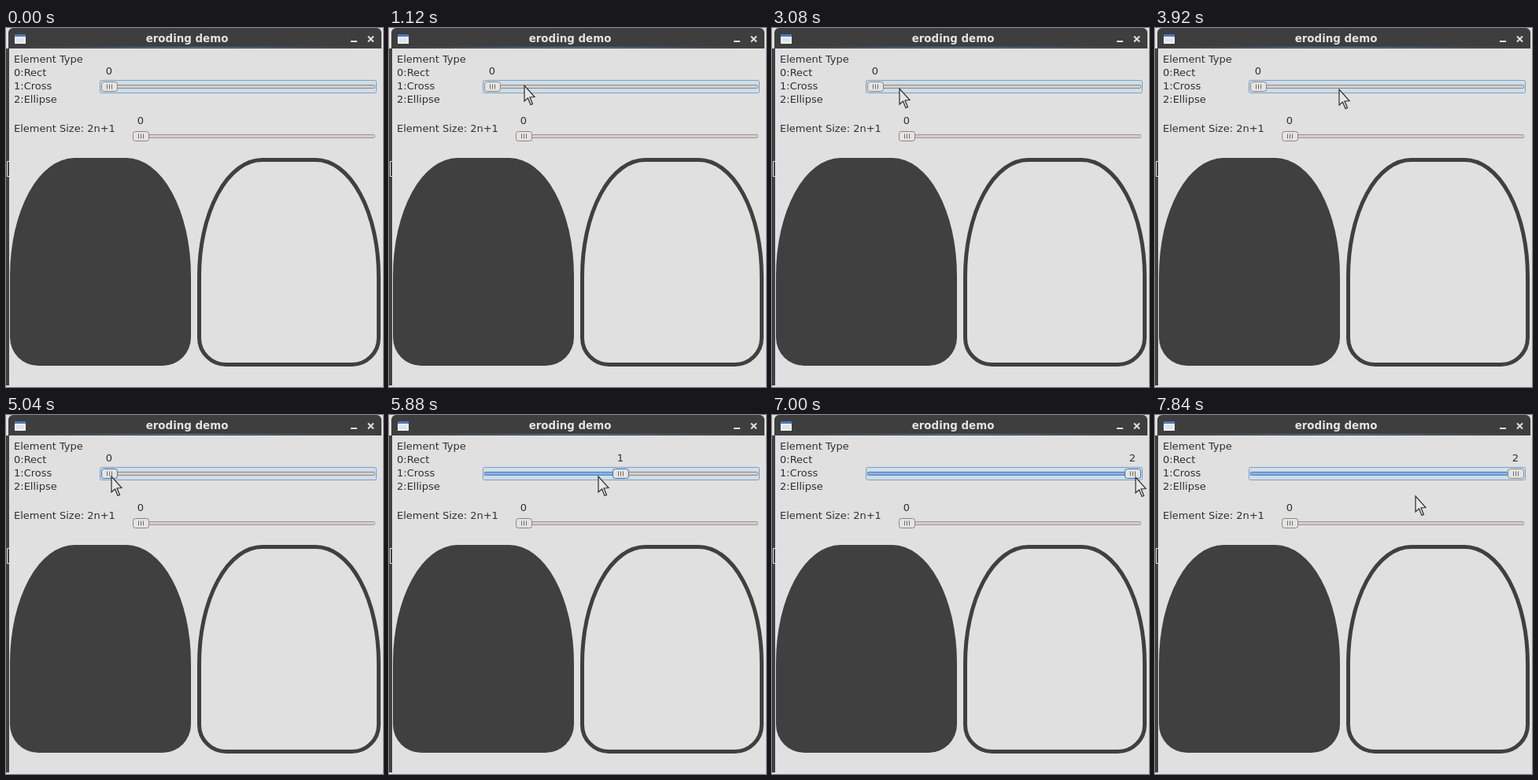
Write an HTML page with a canvas that moves like this. It is 479x456 px and loops after 8000 ms.

```html
<!DOCTYPE html>
<html lang="en">
<head>
<meta charset="utf-8">
<title>eroding demo</title>
<style>
html, body { margin: 0; width: 100%; height: 100%; overflow: hidden; background: #e0e0e0; }
canvas { display: block; }
</style>
</head>
<body>
<canvas id="stage" width="479" height="456"></canvas>
<script>
const ctx = document.getElementById('stage').getContext('2d');
const LOOP = 8000, STEP = 280;
const DARK = '#404040', PAPER = '#e0e0e0', INK = '#303030';
const PRESS = 16, RELEASE = 25;

// Pointer path: step, x, y.
const PATH = [
  [1, 446, 289], [3, 205, 66], [4, 172, 73], [7, 137, 77], [10, 138, 77], [14, 234, 78],
  [PRESS, 136, 77], [18, 134, 78], [23, 354, 78], [RELEASE, 462, 79], [28, 331, 103]
];

function pointerAt(step) {
  const i = PATH.findIndex(key => key[0] >= step);
  if (step < PATH[0][0]) return null;
  const [s1, x1, y1] = PATH[i];
  const [s0, x0, y0] = PATH[Math.max(0, i - 1)];
  const k = s1 > s0 ? (step - s0) / (s1 - s0) : 1;
  return [Math.round(x0 + (x1 - x0) * k), Math.round(y0 + (y1 - y0) * k)];
}

// The drag snaps to whole values and keeps the last one after release.
function valueAt(step) {
  if (step < PRESS) return 0;
  const [x] = pointerAt(Math.min(step, RELEASE));
  return Math.min(2, Math.round((x - 131) / 163.5));
}

function rect(x, y, w, h, color) {
  ctx.fillStyle = color;
  ctx.fillRect(x, y, w, h);
}

function box(x, y, w, h, radius, fill, stroke, line = 1) {
  ctx.beginPath();
  ctx.roundRect(x, y, w, h, radius);
  if (fill) { ctx.fillStyle = fill; ctx.fill(); }
  if (stroke) { ctx.strokeStyle = stroke; ctx.lineWidth = line; ctx.stroke(); }
}

function text(str, x, y, align = 'left', color = INK, font = '13px') {
  ctx.font = `${font} "DejaVu Sans", sans-serif`;
  ctx.textAlign = align;
  ctx.fillStyle = color;
  ctx.fillText(str, x, y);
}

function drawTitleBar() {
  rect(0, 0, 479, 12, PAPER);
  box(3, 0, 474, 26, [6, 6, 0, 0], '#3e3e3e');
  const glow = ctx.createLinearGradient(3, 0, 477, 0);
  glow.addColorStop(0, '#3e3e3e');
  glow.addColorStop(0.5, '#5d88b5');
  glow.addColorStop(1, '#3e3e3e');
  rect(3, 24, 474, 1, glow);

  rect(11, 8, 14, 12, '#f0f0f0');
  rect(11, 8, 14, 3, '#4a78c0');
  rect(13, 13, 10, 5, '#dfe3ea');

  text('eroding demo', 230, 18, 'center', '#e4e4e4', 'bold 13.4px');
  rect(438, 16, 8, 2, PAPER);
  ctx.strokeStyle = PAPER;
  ctx.lineWidth = 2;
  ctx.beginPath();
  ctx.moveTo(460, 10.5); ctx.lineTo(467, 17.5);
  ctx.moveTo(467, 10.5); ctx.lineTo(460, 17.5);
  ctx.stroke();
}

function drawWindow() {
  rect(0, 0, 479, 456, PAPER);
  rect(0, 26, 4, 428, DARK);
  box(1.5, 169.5, 4, 19, 0, null, '#e8e8e8');
  rect(4, 169, 3, 21, PAPER);
  drawTitleBar();
}

function drawSlider(left, y, pos, value, edge, pressed) {
  box(left + 0.5, y - 2, 468 - left, 4, 1, '#d2cfcc', edge);
  if (value) box(left + 0.5, y - 2, pos - left, 4, 1, '#86b0e4', '#527fb8');
  box(pos - 9.5, y - 6, 20, 12, 3, '#e5e4e2', pressed ? '#3c6eb0' : '#888582');
  for (const dx of [-3, 0, 3]) rect(pos + dx, y - 3, 1, 6, '#6a6a6a');
  text(value, pos, y - 15.5, 'center');
}

function drawShapes() {
  const radii = (x, y, foot) => [{ x, y }, { x, y }, foot, foot];
  box(5, 165, 230, 264, radii(82, 150, 36), DARK);
  box(245.5, 167.5, 228, 260, radii(80, 148, 34), PAPER, DARK, 5);
}

function drawPointer([x, y]) {
  ctx.save();
  ctx.translate(x, y);
  ctx.beginPath();
  ctx.moveTo(0, 0);
  for (const [px, py] of [[0, 20], [4.5, 16], [8, 24.5], [10.5, 23.5], [7, 15], [13, 14.5]]) {
    ctx.lineTo(px, py);
  }
  ctx.closePath();
  ctx.fillStyle = '#e8e8e8';
  ctx.fill();
  ctx.strokeStyle = '#2c2c2c';
  ctx.lineWidth = 1.2;
  ctx.stroke();
  ctx.restore();
}

function draw(step) {
  const tip = pointerAt(step);
  const value = valueAt(step);
  const pos = Math.floor(131 + value * 163.5);
  const pressed = step >= PRESS && step <= RELEASE;

  drawWindow();
  ['Element Type', '0:Rect', '1:Cross', '2:Ellipse'].forEach((s, i) => text(s, 10, 44 + 17 * i));
  text('Element Size: 2n+1', 10, 132);

  box(119.5, 66.5, 351, 16, 2, '#d0dde9', '#7da0c4');
  drawSlider(121, 74.5, pos, value, '#8b8a88', pressed);
  drawSlider(162, 137.5, 171, 0, '#a98f8f', false);

  drawShapes();
  if (tip) drawPointer(tip);
}

const start = performance.now();

function tick() {
  const time = (performance.now() - start) % LOOP;
  draw(Math.floor(time / STEP));
  requestAnimationFrame(tick);
}
tick();
</script>
</body>
</html>
```
